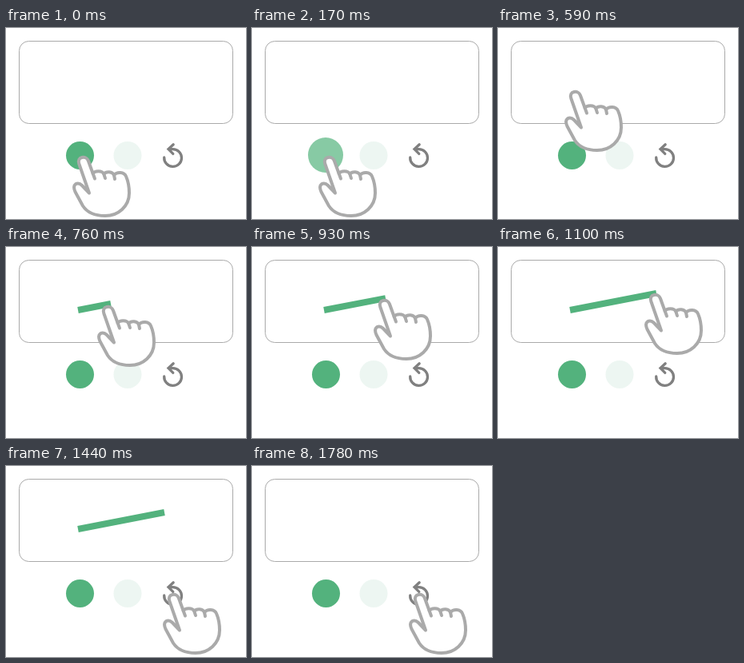
Recreate the animation shown at these times as an HTML page with a canvas. Size 300 by 239 pixels, loop 2080 ms.

```html
<!DOCTYPE html>
<html lang="en">
<head>
<meta charset="utf-8">
<title>Draw and reset</title>
<style>
  html, body { margin: 0; width: 100%; height: 100%; overflow: hidden; background: #fff; }
  canvas { display: block; width: 300px; height: 239px; }
</style>
</head>
<body>
<canvas id="stage"></canvas>
<script>
const W = 300, H = 239, LOOP = 2080;
const GREEN = '#53b27d', PRESSED = '#87caa4', PALE = '#edf6f2';
const GRAY = '#aaaaaa', ICON = '#808080', ICON_PRESSED = '#a8a8a8';

const canvas = document.getElementById('stage');
const ctx = canvas.getContext('2d');
const ratio = window.devicePixelRatio || 1;
canvas.width = W * ratio;
canvas.height = H * ratio;

// Each step holds until the next: start time, hand offset, line end, pressed button
const steps = [
  { at: 0, x: 0, y: 0 },
  { at: 170, x: 0, y: 0, press: 'pen' },
  { at: 420, x: 0, y: -39 },
  { at: 590, x: 0, y: -82 },
  { at: 760, x: 31, y: -87, line: 131 },
  { at: 930, x: 69, y: -95, line: 167 },
  { at: 1100, x: 100, y: -102, line: 198 },
  { at: 1270, x: 105, y: -56, line: 198 },
  { at: 1440, x: 113, y: -1, line: 198 },
  { at: 1610, x: 113, y: -1, press: 'reset' },
  { at: 1780, x: 113, y: -1 }
];

const hand = new Path2D(`
  M104 206.5 L91.3 170
  C89.8 165.5 91.7 162.8 95 162
  C98.6 161.2 101.8 163 103 166.5
  L108.6 182
  C111 178.5 120 178 122.3 182.7
  C125.5 178.8 133 179.6 135 184
  C139 179.6 147.5 180.2 150 185.5
  C152.2 190.5 154 198 154 206.5
  C154 223 140.5 235 124 235
  C111 235 101.5 231 96 222.5
  L86.5 205
  C84.6 200.5 84.7 197 87 195.3
  C90 193.5 93 195 95 197 Z`);
const knuckles = new Path2D('M108.6 182 L111 188.5 M122.3 182.7 L124 188 M135 184 L136 189');
const arrow = new Path2D('M197.7 162 A10.9 10.9 0 1 0 208.6 151.6 L203.5 151.6 M209.2 145.8 L203 151.6 L208.8 157.4');

function dot(x, y, r, color) {
  ctx.fillStyle = color;
  ctx.beginPath();
  ctx.arc(x, y, r, 0, Math.PI * 2);
  ctx.fill();
}

function drawBoard(lineEnd) {
  ctx.strokeStyle = GRAY;
  ctx.lineWidth = 1;
  ctx.beginPath();
  ctx.roundRect(16.5, 16.5, 267, 103, 12);
  ctx.stroke();
  if (!lineEnd) return;
  ctx.strokeStyle = GREEN;
  ctx.lineWidth = 8;
  ctx.lineCap = 'butt';
  ctx.beginPath();
  ctx.moveTo(90, 79);
  ctx.lineTo(lineEnd, 79 - (lineEnd - 90) * 0.194);
  ctx.stroke();
}

function drawReset(pressed) {
  ctx.save();
  if (pressed) {
    ctx.translate(209, 159);
    ctx.scale(1.2, 1.2);
    ctx.translate(-209, -159);
  }
  ctx.strokeStyle = pressed ? ICON_PRESSED : ICON;
  ctx.lineWidth = 3.3;
  ctx.lineCap = 'round';
  ctx.lineJoin = 'miter';
  ctx.stroke(arrow);
  ctx.restore();
}

function drawHand(x, y) {
  ctx.save();
  ctx.translate(x, y);
  ctx.fillStyle = '#fff';
  ctx.strokeStyle = GRAY;
  ctx.lineWidth = 4;
  ctx.lineCap = ctx.lineJoin = 'round';
  ctx.fill(hand);
  ctx.stroke(hand);
  ctx.stroke(knuckles);
  ctx.restore();
}

function draw(time) {
  const step = steps.findLast(s => s.at <= time);
  ctx.setTransform(ratio, 0, 0, ratio, 0, 0);
  ctx.fillStyle = '#fff';
  ctx.fillRect(0, 0, W, H);
  drawBoard(step.line);
  if (step.press === 'pen') dot(92, 159, 22, PRESSED);
  else dot(92.5, 159.5, 17.5, GREEN);
  dot(152, 159.5, 17.5, PALE);
  drawReset(step.press === 'reset');
  drawHand(step.x, step.y);
}

function tick() {
  draw(performance.now() % LOOP);
  requestAnimationFrame(tick);
}
tick();
</script>
</body>
</html>
```
